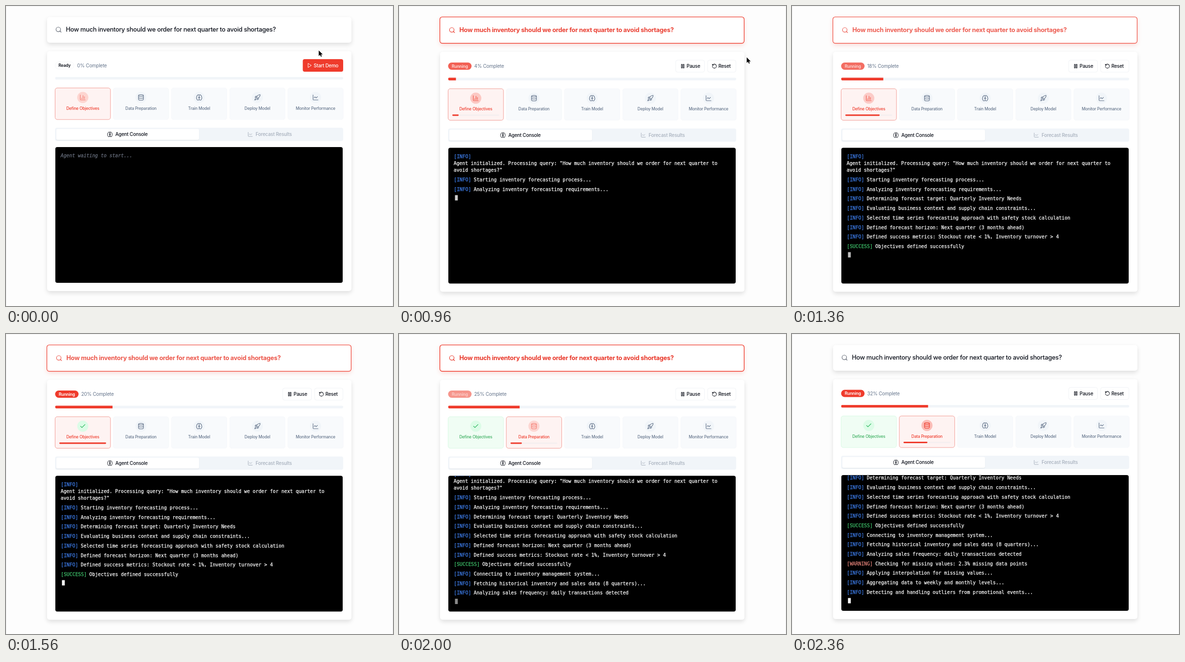
Animation of 800x621 px, one loop 2400 ms. Source, as an HTML page with a canvas:

```html
<!DOCTYPE html>
<html lang="en">
<head>
<meta charset="utf-8">
<title>Forecast agent demo</title>
<style>
html, body { margin: 0; width: 100%; height: 100%; overflow: hidden; background: #fdfdfd; }
canvas { display: block; }
</style>
</head>
<body>
<canvas id="stage" width="800" height="621"></canvas>
<script>
const ctx = document.getElementById('stage').getContext('2d');
const LOOP = 2400, START = 750, DONE = 1426, NEXT = 1600, CALM = 2180;
const RED = '#ef3b2c', SLATE = '#64748b', DARK = '#0b0f19', GREEN = '#3aae5f';
const QUERY = 'How much inventory should we order for next quarter to avoid shortages?';

// Icons on a 24 unit grid
const axes = 'M3 3v16a2 2 0 0 0 2 2h16';
const ICON = {
  search: 'M19 11a8 8 0 1 1-16 0 8 8 0 0 1 16 0M21 21l-4.3-4.3',
  bars: axes + 'M18 17V9M13 17V5M8 17v-3',
  data: 'M3 5a9 3 0 0 1 18 0 9 3 0 0 1-18 0V19A9 3 0 0 0 21 19V5M3 12A9 3 0 0 0 21 12',
  brain: 'M12 5a3 3 0 1 0-5.997.125 4 4 0 0 0-2.526 5.77 4 4 0 0 0 .556 6.588A4 4 0 1 0 12 18Z' +
    'M12 5a3 3 0 1 1 5.997.125 4 4 0 0 1 2.526 5.77 4 4 0 0 1-.556 6.588A4 4 0 1 1 12 18Z' +
    'M15 13a4.5 4.5 0 0 1-3-4 4.5 4.5 0 0 1-3 4',
  rocket: 'M4.5 16.5c-1.5 1.26-2 5-2 5s3.74-.5 5-2c.71-.84.7-2.13-.09-2.91a2.18 2.18 0 0 0-2.91-.09z' +
    'M12 15l-3-3a22 22 0 0 1 2-3.95A12.88 12.88 0 0 1 22 2c0 2.72-.78 7.5-6 11a22.35 22.35 0 0 1-4 2z' +
    'M9 12H4s.55-3.03 2-4c1.62-1.08 5 0 5 0M12 15v5s3.03-.55 4-2c1.08-1.62 0-5 0-5',
  line: axes + 'M19 9l-5 5-4-4-3 3',
  check: 'M20 6L9 17l-5-5',
  play: 'M6 3l14 9-14 9z',
  pause: 'M6 4h4v16H6zM14 4h4v16h-4z',
  reset: 'M3 12a9 9 0 1 0 9-9 9.75 9.75 0 0 0-6.74 2.74L3 8M3 3v5h5'
};
const ARROW = new Path2D('M0 0V11.5L2.7 9 4.5 13 6.3 12.2 4.6 8.3H8.2Z');
const HAND = new Path2D('M3.5 8V1.5a1.2 1.2 0 0 1 2.4 0V5.5a1.1 1.1 0 0 1 2.1.2 1.1 1.1 0 0 1 2 .4' +
  ' 1 1 0 0 1 1.8.7V10c0 2-1 2.5-1.2 4H5C4.5 12 2 10 .8 8.2 0 7 1.5 6 2.4 7Z');

const STEPS = [['bars', 'Define Objectives'], ['data', 'Data Preparation'], ['brain', 'Train Model'],
  ['rocket', 'Deploy Model'], ['line', 'Monitor Performance']];
const LOGS = [
  'Starting inventory forecasting process...',
  'Analyzing inventory forecasting requirements...',
  'Determining forecast target: Quarterly Inventory Needs',
  'Evaluating business context and supply chain constraints...',
  'Selected time series forecasting approach with safety stock calculation',
  'Defined forecast horizon: Next quarter (3 months ahead)',
  'Defined success metrics: Stockout rate < 1%, Inventory turnover > 4',
  'SUCCESS:Objectives defined successfully',
  'Connecting to inventory management system...',
  'Fetching historical inventory and sales data (8 quarters)...',
  'Analyzing sales frequency: daily transactions detected',
  'WARNING:Checking for missing values: 2.3% missing data points',
  'Applying interpolation for missing values...',
  'Aggregating data to weekly and monthly levels...',
  'Detecting and handling outliers from promotional events...'
];
const TAGS = { INFO: '#3f7fee', SUCCESS: '#3fc46c', WARNING: '#e5837a' };
const MONO_ADVANCE = 5.93, LINE = 19.7;
const stepOneTimes = Array.from({ length: 8 }, (_, i) => 760 + 74 * (i + 1));
const stepTwoTimes = [1610, 1700, 1880, 2020, 2122, 2224, 2326];
const logTimes = [...stepOneTimes, ...stepTwoTimes];

const clamp = v => Math.max(0, Math.min(1, v));
const smooth = v => (v = clamp(v), v * v * (3 - 2 * v));
const ramp = (t, from, to) => smooth((t - from) / (to - from));
const count = (times, t) => times.filter(at => at <= t).length;
const eased = (times, t) => times.reduce((sum, at) => sum + ramp(t, at, at + 150), 0);
const wave = (t, peak, period) => (1 + Math.cos(2 * Math.PI * (t - peak) / period)) / 2;
const mix = (a, b, k) => `rgb(${a.map((v, i) => Math.round(v + (b[i] - v) * k))})`;

function box(x, y, w, h, r, fill, stroke, lineWidth = 1) {
  ctx.beginPath();
  ctx.roundRect(x, y, w, h, r);
  if (fill) { ctx.fillStyle = fill; ctx.fill(); }
  if (stroke) { ctx.strokeStyle = stroke; ctx.lineWidth = lineWidth; ctx.stroke(); }
}

function shadowBox(color, blur, dy, ...args) {
  ctx.save();
  ctx.shadowColor = color;
  ctx.shadowBlur = blur;
  ctx.shadowOffsetY = dy;
  box(...args);
  ctx.restore();
}

function text(str, x, cy, size, color, weight = 500, align = 'left') {
  ctx.font = `${weight} ${size}px Inter, sans-serif`;
  ctx.letterSpacing = `${-0.02 * size}px`;
  ctx.textAlign = align;
  ctx.fillStyle = color;
  ctx.fillText(str, x, cy + 0.36 * size);
}

// A hairline stroke gives the console type its sturdier weight
function mono(str, x, cy, color, style = '') {
  ctx.font = `${style} 9.85px "DejaVu Sans Mono", monospace`;
  ctx.letterSpacing = '0px';
  ctx.textAlign = 'left';
  ctx.fillStyle = ctx.strokeStyle = color;
  ctx.lineWidth = 0.25;
  ctx.fillText(str, x, cy + 3.5);
  ctx.strokeText(str, x, cy + 3.5);
}

function icon(name, cx, cy, size, color, weight = 2) {
  ctx.save();
  ctx.translate(cx - size / 2, cy - size / 2);
  ctx.scale(size / 24, size / 24);
  ctx.lineCap = ctx.lineJoin = 'round';
  ctx.lineWidth = weight;
  ctx.strokeStyle = color;
  ctx.stroke(new Path2D(ICON[name]));
  ctx.restore();
}

function faded(alpha, draw) {
  ctx.save();
  ctx.globalAlpha = alpha;
  draw();
  ctx.restore();
}

function drawSearch(t, busy) {
  const red = [233, 54, 40];
  const heat = ramp(t, START, START + 140) * (1 - ramp(t, CALM, CALM + 160));
  const glow = busy ? 0.8 + 0.2 * wave(t, 2000, 1260) : 1;
  const shift = busy ? 1 : 0;
  if (busy) {
    shadowBox('rgba(239,59,44,.17)', 10, 4, 84.5, 22.6, 629, 54.6, 5, '#fff');
    faded(glow, () => box(84.5, 22.6, 629, 54.6, 5, null, RED, 1.4));
  } else {
    shadowBox('rgba(0,0,0,.12)', 10, 4, 85, 23, 629, 53, 5, '#fff');
  }
  faded(glow, () => {
    icon('search', 108.7 + shift, 49 + shift, 14, mix([100, 106, 118], red, heat));
    text(QUERY, 123.7 + shift, 48.7 + shift, 12.85, mix([11, 15, 25], red, heat), busy ? 700 : 500);
  });
}

function drawHeader(running, pulse, hover, percent, shown) {
  if (running) {
    faded(pulse, () => {
      box(101.5, 115.5, 48.5, 15, 7.5, RED);
      text('Running', 125.7, 123, 8.7, '#fff', 600, 'center');
    });
    text(percent + '% Complete', 155.5, 123, 9.9, SLATE, 400);
    for (const [x, w] of [[571.5, 60.5], [637.5, 59.5]])
      box(x + .5, 110.5, w - 1, 25, 4, '#fff', '#f1f3f6');
    icon('pause', 586.5, 123, 11, DARK, 2.2);
    text('Pause', 594.6, 123, 9.9, DARK);
    icon('reset', 652, 123, 11, DARK, 2.2);
    text('Reset', 660.2, 123, 9.9, DARK);
  } else {
    box(101.5, 115.5, 39, 15, 7.5, '#fff', '#f6f7f9');
    text('Ready', 121, 123, 8.5, DARK, 600, 'center');
    text('0% Complete', 147, 123, 9.9, SLATE, 400);
    box(613.5, 110, 83.5, 26, 4, hover ? '#f14f42' : RED);
    icon('play', 627.5, 123, 11, '#fff');
    text('Start Demo', 636, 123, 9.9, '#fff');
  }
  ctx.save();
  ctx.beginPath();
  ctx.roundRect(101.5, 146.8, 595.5, 5.6, 2.8);
  ctx.clip();
  box(101.5, 146.8, 595.5, 5.6, 0, '#f1f5f9');
  box(101.5, 146.8, 595.5 * shown / 100, 5.6, 0, RED);
  ctx.restore();
}

function drawSteps(t, running, pulse, stepShown) {
  const active = t < NEXT ? 0 : 1;
  STEPS.forEach(([name, label], i) => {
    const x = 101.5 + 120.3 * i, cx = x + 57.2;
    const on = i === active, past = i < active, checked = i === 0 && t >= DONE;
    box(x, 169.7, 114.5, 65.3, 4.5, on ? '#fef3f2' : past ? '#f0fdf4' : '#f8fafc',
      on ? '#f29d96' : past ? '#d9f9e4' : '#f6f8fb');
    faded(on && !checked ? pulse : 1, () => {
      box(cx - 11.5, 177.8, 23, 23, 11.5, checked ? '#dcfce7' : on ? '#fbbdb7' : '#f1f5f9');
      icon(checked ? 'check' : name, cx, 189.3, 13.8, checked ? '#22b455' : on ? RED : SLATE);
    });
    text(label, cx, 211.7, 8.4, on ? RED : past ? GREEN : SLATE, 500, 'center');
    if (on && running) {
      box(cx - 48.5, 223, 97, 2.9, 1.4, '#f6eff0');
      if (stepShown > 0) box(cx - 48.5, 223, 97 * stepShown, 2.9, 1.4, RED);
    }
  });
}

function drawTabs() {
  box(101.5, 252, 595.5, 27.5, 4, '#f1f5f9');
  shadowBox('rgba(0,0,0,.07)', 2, 1, 104, 254.5, 295, 22.5, 3, '#fff');
  icon('brain', 214.8, 265.7, 12, DARK);
  text('Agent Console', 226, 265.7, 9.9, DARK);
  icon('line', 505, 265.7, 11.5, '#a6afbc');
  text('Forecast Results', 516, 265.7, 9.9, '#a6afbc');
}

function drawConsole(t, running, pulse) {
  box(102, 292, 594, 281, 4, '#000');
  if (!running) return mono('Agent waiting to start...', 113, 309.5, '#6b7280', 'italic');
  const lines = count(logTimes, t);
  const top = 358 - Math.max(0, LINE * (lines - 10) + 1);
  ctx.save();
  ctx.beginPath();
  ctx.rect(102, 292, 594, 281);
  ctx.clip();
  mono('[INFO]', 113.5, top - 48, TAGS.INFO);
  mono(`Agent initialized. Processing query: "${QUERY.slice(0, 54)}`, 113, top - 34, '#fff');
  mono(QUERY.slice(55) + '"', 113, top - 20, '#fff');
  LOGS.slice(0, lines).forEach((entry, i) => {
    const [, tag = 'INFO', message] = entry.match(/^(?:(SUCCESS|WARNING):)?(.*)$/);
    const y = top + LINE * i;
    mono(`[${tag}]`, 113.5, y, TAGS[tag]);
    mono(message, 113 + MONO_ADVANCE * (tag.length + 3), y, '#fff');
  });
  faded(pulse, () => box(115.7, top + LINE * lines - 7.5, 5.8, 11, 0, '#fff'));
  ctx.restore();
}

function drawPointer(x, y, overButton) {
  ctx.save();
  ctx.translate(overButton ? x - 4.7 : x, y);
  ctx.lineJoin = 'round';
  const shape = overButton ? HAND : ARROW;
  ctx.lineWidth = overButton ? 1 : 1.6;
  ctx.strokeStyle = overButton ? '#000' : '#fff';
  ctx.fillStyle = overButton ? '#fff' : '#000';
  if (overButton) ctx.fill(shape);
  ctx.stroke(shape);
  if (!overButton) ctx.fill(shape);
  ctx.restore();
}

function render(t) {
  const running = t >= START, busy = running && t < CALM;
  const pulse = 0.54 + 0.46 * wave(t, running ? 1580 : 340, 800);
  const firstTimes = [...stepOneTimes, DONE];
  const percent = Math.round(count(firstTimes, t) * 20 / 9 + count(stepTwoTimes, t) * 20 / 12);
  const first = eased(firstTimes, t) / 9, second = eased(stepTwoTimes, t) / 12;
  const reach = ramp(t, 80, 520), leave = ramp(t, 780, 1020);
  const px = 646.5 - 10 * reach + 97 * leave, py = 92 + 33 * reach - 22 * leave;
  const hover = py > 110 && px < 697;

  ctx.fillStyle = '#fdfdfd';
  ctx.fillRect(0, 0, 800, 621);
  ctx.fillStyle = '#efefef';
  ctx.fillRect(0, 0, 1, 621);
  ctx.fillRect(799, 0, 1, 621);
  ctx.fillRect(0, 0, 800, 1);

  drawSearch(t, busy);
  ctx.save();
  ctx.translate(0, busy ? 1.5 : 0);
  shadowBox('rgba(0,0,0,.12)', 10, 4, 85, 93.5, 629, 496.5, 5, '#fff');
  drawHeader(running, pulse, hover, percent, 20 * (first + second));
  drawSteps(t, running, pulse, t < NEXT ? first : second);
  drawTabs();
  drawConsole(t, running, pulse);
  ctx.restore();
  if (t < 1020) drawPointer(px, py, hover);
}

function tick() {
  render(performance.now() % LOOP);
  requestAnimationFrame(tick);
}
tick();
</script>
</body>
</html>
```
